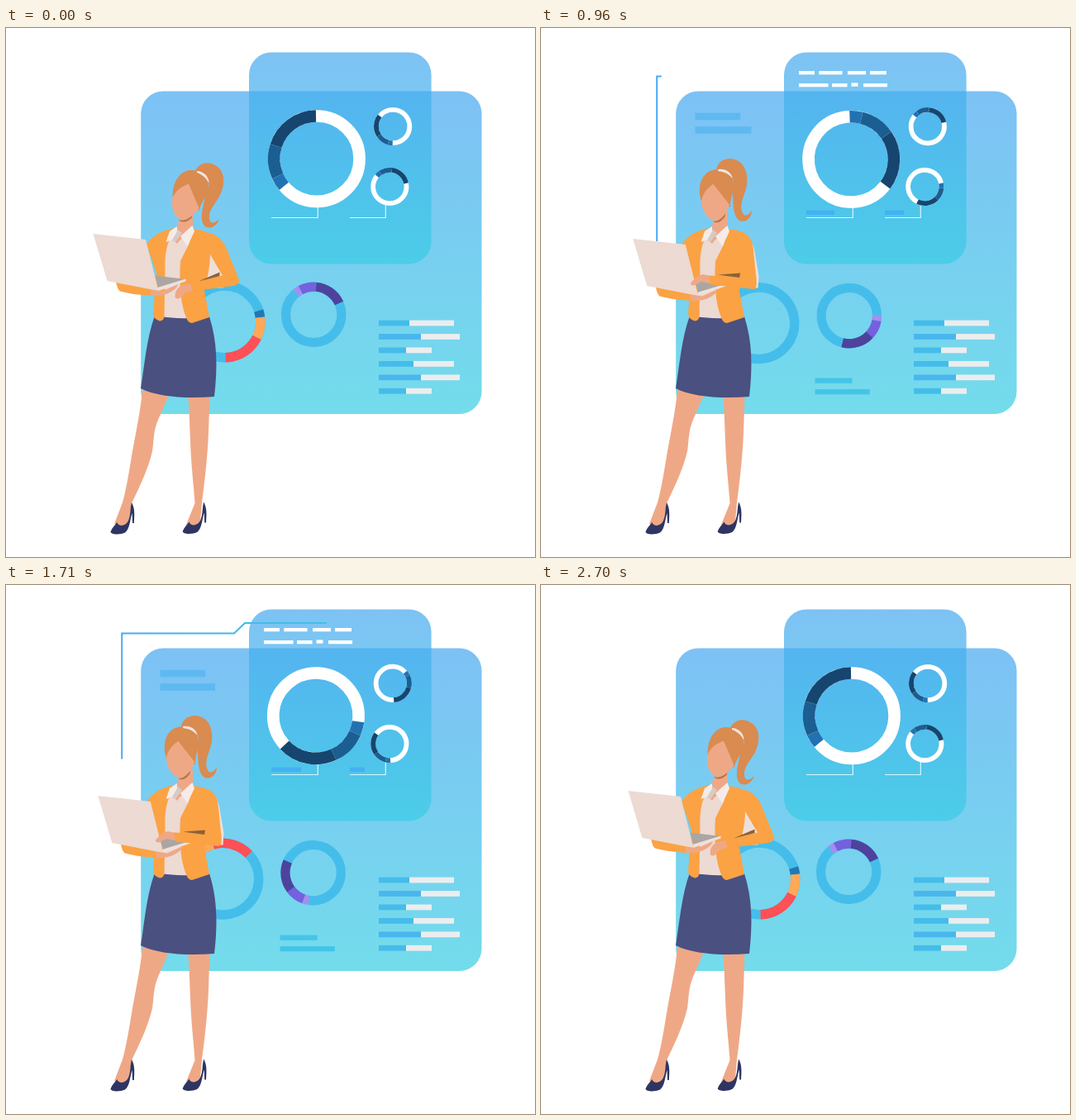
These frames come from a looping animation (640 by 640 pixels, 2760 ms). An HTML page:

```html
<!DOCTYPE html>
<html lang="en">
<head>
<meta charset="utf-8">
<title>Dashboard presenter</title>
<style>
html, body { margin: 0; width: 100%; height: 100%; overflow: hidden; background: #fff; }
svg { display: block; width: 100vw; height: 100vh; }
</style>
</head>
<body>
<svg viewBox="0 0 640 640" xmlns="http://www.w3.org/2000/svg">
  <defs>
    <linearGradient id="back" x2="0" y2="1">
      <stop stop-color="#7dc1f5"/><stop offset="1" stop-color="#73dceb"/>
    </linearGradient>
    <linearGradient id="front" x2="0" y2="1">
      <stop stop-color="#45a8ef"/><stop offset="1" stop-color="#39cce5"/>
    </linearGradient>
    <linearGradient id="wire" gradientUnits="userSpaceOnUse" x1="140" x2="388">
      <stop stop-color="#4aaaf3"/><stop offset="1" stop-color="#3fc3e5"/>
    </linearGradient>
  </defs>

  <rect x="163.2" y="76.5" width="412.3" height="390.5" rx="27" fill="url(#back)"/>
  <rect x="294" y="29.5" width="220.6" height="256" rx="27" fill="url(#front)" opacity=".7"/>
  <path d="M321 229.5H377.3V216M416 229.5H459.3V213" fill="none" stroke="#d9f6fb" stroke-width="1.2"/>
  <g id="bars"></g>
  <g id="rings"></g>
  <path id="line" d="M140.2 258V58.5H276L289 46H388" fill="none" stroke="url(#wire)" stroke-width="2" pathLength="1"/>

  <g id="legs" fill="#efa886">
    <path d="M165 438C163 462 157 490 153 512C149 536 146 556 141 574L131 600L141 606L149 598L152 575C161 556 172 534 177 512C179 500 178 488 184 474L197 444Z"/>
    <path d="M220 444C222 462 222 480 223 500C224 530 227 552 228.500 575L218 601L229 606L235 598L237 574C241 545 244 515 245 490L246.500 444Z"/>
  </g>
  <g fill="#2f3562">
    <path id="shoe" d="M152 574C156 581 155.500 589 154.800 599H153L152.600 587C150 594 150 606 144 610.500C139 613 127 613.500 126.500 609.500C128 605 132 601 134.500 598C135 603 144 604 148 596C151 590 150 581 152 574Z"/>
    <use href="#shoe" x="87.200" y="-.5"/>
  </g>
  <path d="M234 246C248 246 256 258 258 268L263.500 300L262.500 314.500L240 314Z" fill="#efdfd9"/>
  <g id="farArm">
    <path d="M133 307L179 316L179 324C164 323.500 149 321.500 138 318.500Q135 317 133 307Z" fill="#fba244"/>
  </g>
  <path d="M203 243L226 244L222 352H190L191 262Z" fill="#ecdad3"/>
  <path d="M180 348C202 352 226 352 246 349C256 380 256 412 252 446C218 449 182 446 163 436C168 405 170 376 180 348Z" fill="#4a5080"/>
  <g fill="#fba244">
    <path d="M203 242C190 245 178 250 170 262L182 296L178 346Q178 352 186 354.500Q191 354 191.500 349L192.500 295C192 280 193 268 197 258Z"/>
    <path d="M226 243C236 244 243 246 247 250L247 273C247 290 243 304 240 318L246 350L225 357Q220 357 218 350C212 336 209 312 211 282L221 262Z"/>
  </g>
  <path d="M207 236L226 222V240C221 250 211 254 207 261L203 257C207 250 208 244 207 236Z" fill="#efa886"/>
  <path d="M207 240L198 246L193.500 259L201 256L207 247Z" fill="#f5ece9"/>
  <path d="M208 244L201 257L205 259L213 248Z" fill="#d7cbc7"/>
  <path d="M225.500 239L228 246L219.500 264L211 252Z" fill="#f5ece9"/>

  <g id="head">
    <path d="M209 232C216 234 222 230 226 222L225 229C221 234 213 237 209 232Z" fill="#b77445"/>
    <path d="M229 173C233 163 245 161 253 166C263 171 265 183 262 194C259 207 248 215 246 226C245 237 251 238 258 231C254 243 243 244 239 238C234 229 239 216 240 208L246 190Z" fill="#d98b50"/>
    <path d="M202 207C200 189 209 173 223 172C237 172 246 181 245 194C243 205 236 210 233.500 221L224 212Z" fill="#d98b50"/>
    <path d="M201 207C204 197 212 192 221 188.500L233.500 218C229 224 222 232 214 232.500C204 231 200 219 201 207Z" fill="#efa886"/>
    <path d="M231 173C239 173 246 180 245.500 188C242 181 237 177 231 175Z" fill="#f4e3dc"/>
  </g>

  <g id="laptop">
    <path d="M105.500 249L169 256L184.500 318L122.500 306Z" fill="#ecdad3"/>
    <path d="M180.500 299.500L217.500 304L184 314Z" fill="#aba6a3"/>
    <path d="M183.500 314L217.500 303.500V306.500L184.500 318Z" fill="#eee1dc"/>
    <path d="M175 317L189 318.500L208 310Q207 316 195 321.500Q187 325 175 323.500Z" fill="#efa886"/>
  </g>
  <path id="hand" fill="#efa886"/>
  <path id="sleeve" fill="#fba244"/>
  <path id="pencil" fill="#8a6239"/>
</svg>

<script>
const STEP = 30, LAST = 90, LOOP = 2760;
const $ = id => document.getElementById(id);

function add(parent, tag, attrs) {
  const el = document.createElementNS('http://www.w3.org/2000/svg', tag);
  for (const k in attrs) el.setAttribute(k, attrs[k]);
  parent.appendChild(el);
  return el;
}

const clamp = v => Math.max(0, Math.min(1, v));
const ease = (t, a, b) => (1 - Math.cos(Math.PI * clamp((t - a) / (b - a)))) / 2;
const pulse = (t, [a, b, c, d]) => ease(t, a, b) - ease(t, c, d);

// Donuts: angles run clockwise from the top.
function arc(cx, cy, r, a, b) {
  const at = deg => {
    const q = deg * Math.PI / 180;
    return (cx + r * Math.sin(q)).toFixed(2) + ' ' + (cy - r * Math.cos(q)).toFixed(2);
  };
  return `M${at(a)}A${r} ${r} 0 ${b - a > 180 ? 1 : 0} 1 ${at(b)}`;
}

const navy = ['#2272b2', '#1b5e92', '#16466f'];
const donuts = [
  { x: 375.4, y: 158.4, dx: .5, dy: -.2, r: 51.7, w: 14.6, base: '#fff', cuts: [230, 246, 287.5, 359], colors: navy },
  { x: 467.9, y: 119, dx: .2, dy: 0, r: 20.2, w: 5.8, base: '#fff', cuts: [181, 196, 237, 308], colors: navy },
  { x: 464.3, y: 192, dx: 0, dy: 0, r: 20.2, w: 5.8, base: '#fff', cuts: [-50, -34, 7, 78], colors: navy },
  { x: 372.2, y: 347.6, dx: 0, dy: -.8, r: 33.7, w: 11.2, base: '#45bdeb', cuts: [-39, -28, 5, 66], colors: ['#a48ff0', '#7560de', '#4d439d'] },
  { x: 263.5, y: 356, dx: 1, dy: -.6, r: 43.3, w: 11.5, base: '#45bdeb', cuts: [72, 83, 116, 178.5], colors: ['#2178b5', '#ffa956', '#ff5056'] }
];
for (const d of donuts) {
  const cx = d.x + d.dx, cy = d.y + d.dy;
  d.el = add($('rings'), 'g', { fill: 'none', 'stroke-width': d.w });
  add(d.el, 'circle', { cx, cy, r: d.r, stroke: d.base });
  d.colors.forEach((stroke, i) =>
    add(d.el, 'path', { d: arc(cx, cy, d.r, d.cuts[i], d.cuts[i + 1]), stroke }));
}

// Table at the lower right: blue part, then grey part.
[[488, 542], [502, 549], [484, 515], [493, 542], [502, 549], [484, 515]].forEach(([mid, end], i) => {
  const y = 353.6 + i * 16.45, height = 6.8;
  add($('bars'), 'rect', { x: 451, y, width: mid - 451, height, fill: i % 3 === 1 ? '#49b6ee' : '#45bcea' });
  add($('bars'), 'rect', { x: mid, y, width: end - mid, height, fill: '#ecedef' });
});

// Bars uncovered from left to right by a moving edge.
const wipes = [
  { from: 312, span: 133, times: [0, 1350, 1350, 2700], fill: '#fff', h: 4.3,
    bars: [[312, 52, 19], [336.3, 52, 28.2], [371, 52, 22], [398, 52, 20],
           [312, 67, 35.5], [352, 67, 18.5], [375.5, 66.4, 8], [390, 67, 29], [426, 66.4, 17.5]] },
  { from: 186.5, span: 78, times: [390, 1134, 1418, 2578], fill: '#5fb9f1', h: 8.7,
    bars: [[186.5, 102.7, 54.7], [186.5, 119.2, 77.8]] },
  { from: 331.5, span: 80, times: [390, 1134, 1418, 2578], fill: '#44c5e8', h: 6.3,
    bars: [[331.5, 423.5, 45], [331.5, 437, 66.3]] },
  { from: 321, span: 39, times: [294, 1164, 1504, 2642], fill: '#45b0f2', h: 5.4, bars: [[321, 220.6, 39]] },
  { from: 416, span: 23, times: [150, 750, 1270, 2690], fill: '#45b0f2', h: 5.4, bars: [[416, 220.6, 23]] }
];
for (const w of wipes)
  w.els = w.bars.map(([x, y]) => add($('bars'), 'rect', { x, y, height: w.h, fill: w.fill }));

// Near arm: resting pose and typing pose, blended number by number.
const poses = {
  sleeve: [
    'M238 247C252 247 262 254 268 270C273 283 279 296 282 305C283 311 276 312 268 313L226 318L222 307L262 299.5L247 274C242 265 240 255 238 247Z',
    'M238 246C246 246 254 252 256 262C258 276 259 292 260.5 303C261 313 260 317 256 315.7L205 310.500L203 299.5L241 301L240 274C238 265 238 255 238 246Z'
  ],
  hand: [
    'M225 309L213 311Q207 314 205 320L204.5 326Q208 329 211 326L216 321L226 317Z',
    'M205 300L196 298Q189 300 186 303L180.5 309Q183 313 186 311L194 307L205 309Z'
  ],
  pencil: ['M233 306.500L258.5 295.5L258.5 300Z', 'M214 298.5L241 296.5L240 302Z']
};
function blend([a, b], k) {
  const to = b.match(/[\d.]+/g);
  let i = 0;
  return a.replace(/[\d.]+/g, v => (+v + (to[i++] - v) * k).toFixed(2));
}

function draw(t) {
  const turn = t / (STEP * LAST) * 360;
  for (const d of donuts) d.el.setAttribute('transform', `rotate(${turn} ${d.x} ${d.y})`);

  for (const w of wipes) {
    const edge = w.from + w.span * pulse(t, w.times);
    w.bars.forEach(([x, , width], i) =>
      w.els[i].setAttribute('width', Math.max(0, Math.min(width, edge - x))));
  }

  const head = ease(t, 390, 1602), tail = ease(t, 1447, 2700), len = head - tail;
  $('line').setAttribute('stroke-dasharray', `${len} 2`);
  $('line').setAttribute('stroke-dashoffset', -tail);
  $('line').setAttribute('visibility', len > .001 ? 'visible' : 'hidden');

  const k = pulse(t, [279, 995, 1695, 2411]);
  $('head').setAttribute('transform', `rotate(${-15.3 * k} 216 236)`);
  for (const id of ['laptop', 'farArm'])
    $(id).setAttribute('transform', `translate(${5.8 * k} ${6 * k})`);
  for (const id in poses) $(id).setAttribute('d', blend(poses[id], k));
}

function tick() {
  const t = performance.now() % LOOP;
  draw(Math.min(LAST, Math.floor(t / STEP)) * STEP);
  requestAnimationFrame(tick);
}
tick();
</script>
</body>
</html>
```
